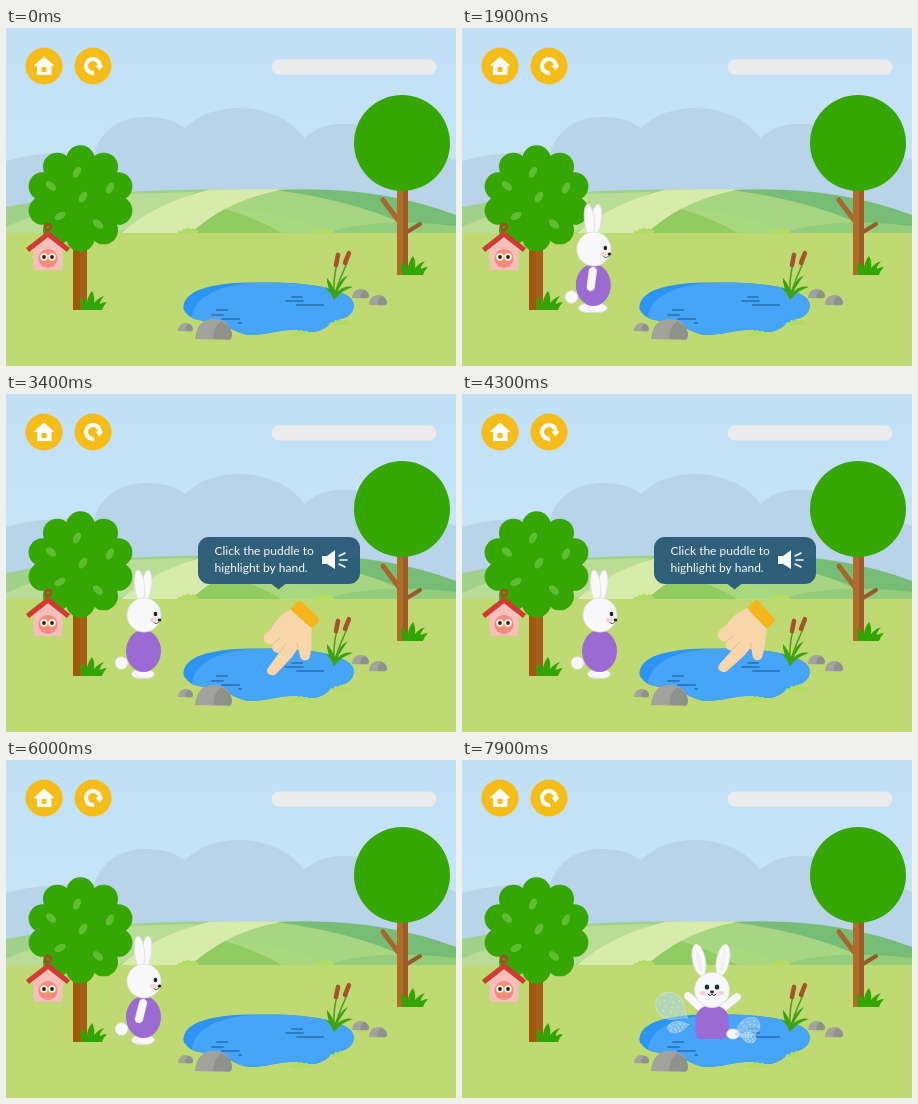
An HTML page with a canvas for the animation above (8 s loop, 450x338 px).

```html
<!DOCTYPE html>
<html lang="en">
<head>
<meta charset="utf-8">
<title>Puddle</title>
<style>
html, body { margin: 0; width: 100%; height: 100%; overflow: hidden; background: #c3e1f6; }
canvas { display: block; width: 450px; height: 338px; }
</style>
</head>
<body>
<canvas id="stage"></canvas>
<script>
const W = 450, H = 338, LOOP = 8000, TAU = Math.PI * 2;
const ARRIVE = 1970, JUMP = 6050, LAND = 6600, SPLASH = 750;
const canvas = document.getElementById('stage');
const dpr = window.devicePixelRatio || 1;
canvas.width = W * dpr;
canvas.height = H * dpr;
const screen2d = canvas.getContext('2d');
const backdrop = document.createElement('canvas');
backdrop.width = canvas.width;
backdrop.height = canvas.height;
let c = backdrop.getContext('2d');
c.scale(dpr, dpr);
screen2d.scale(dpr, dpr);

const clamp = v => Math.max(0, Math.min(1, v));
const lerp = (a, b, k) => a + (b - a) * k;
const ramp = (t, a, b) => clamp((t - a) / (b - a));
const smooth = k => k * k * (3 - 2 * k);

function ell(x, y, rx, ry, fill, rot = 0, edge) {
  c.beginPath();
  c.ellipse(x, y, rx, ry, rot, 0, TAU);
  c.fillStyle = fill;
  c.fill();
  if (edge) { c.strokeStyle = edge; c.lineWidth = 0.8; c.stroke(); }
}
const dot = (x, y, r, fill, edge) => ell(x, y, r, r, fill, 0, edge);
function shape(d, fill) {
  c.fillStyle = fill;
  c.fill(new Path2D(d));
}
function line(d, color, width, cap = 'round') {
  c.strokeStyle = color;
  c.lineWidth = width;
  c.lineCap = cap;
  c.lineJoin = 'miter';
  c.stroke(new Path2D(d));
}
function box(x, y, w, h, r, fill) {
  c.beginPath();
  c.roundRect(x, y, w, h, r);
  c.fillStyle = fill;
  c.fill();
}
function placed(x, y, rot, draw) {
  c.save();
  c.translate(x, y);
  c.rotate(rot);
  draw();
  c.restore();
}

function landscape() {
  const sky = c.createLinearGradient(0, 0, 0, 170);
  sky.addColorStop(0, '#c1e0f6');
  sky.addColorStop(1, '#c8e5f7');
  c.fillStyle = sky;
  c.fillRect(0, 0, W, H);
  shape('M0 133 Q40 122 88 125 C96 99 117 89 142 89 Q164 89 179 100 C194 86 212 80 232 80 C262 80 286 92 298 110 C311 99 325 95 342 96 C366 97 385 108 395 125 Q425 122 450 132 V205 H0Z', '#b7d4e8');
  shape('M0 179 Q90 161 215 161.500 Q300 162 370 180 L450 200 V206 H0Z', '#9fd18a');
  shape('M0 199 Q50 176 120 166 L190 164 L110 206 H0Z', '#b9dd96');
  shape('M114 206 Q150 174 205 161.500 H278 Q220 178 184 206Z', '#d7ebab');
  shape('M184 206 Q222 172 278 161.500 Q330 170 400 206Z', '#a9d97e');
  shape('M184 206 Q200 191 219 181 Q250 190 278 206Z', '#90cc62');
  shape('M219 181 Q245 167 278 161.500 Q360 164 450 206 H330 Q280 184 219 181Z', '#a6d681');
  shape('M270 162 Q370 157 450 187 V206 H418 Q360 174 270 162Z', '#78bd75');
  shape('M318 206 Q365 188 450 198 V206Z', '#94ce7d');
  c.fillStyle = '#c0da73';
  c.fillRect(0, 205, W, H - 205);
}

function bush(x, y, s = 1) {
  shape(`M${x - 10 * s} ${y} q2 -5 5 -2 q0 -5 4 -2 q2 -4 5 0 q4 -3 4 1 q4 -1 3 3Z`, '#b3dd62');
}

function tuft(x, y) {
  shape(`M${x} ${y} l-1 -13 q6 3 7 7 q0 -7 5 -13 q3 5 2 12 q4 -5 10 -7 q-5 6 -4 8 q3 -2 7 -2 q-4 4 -5 8Z`, '#32a600');
}

function leftTree() {
  box(67, 210, 8, 72, 0, '#a3560c');
  box(74, 210, 7, 72, 0, '#a4601a');
  const green = '#35a602';
  ell(74, 170, 41, 42, green);
  for (let i = 0; i < 10; i++) {
    const a = i * TAU / 10;
    dot(74.5 + 39.5 * Math.sin(a), 170.5 - 39 * Math.cos(a), 14.3, green);
  }
  [[45, 158, .7], [71, 144, -1.1], [104, 160, -1.1], [77, 169, -1], [54, 188, -.5], [92, 196, .7]]
    .forEach(([x, y, a]) => ell(x, y, 6, 3.5, '#5fbd33', a));
  tuft(75, 282);
}

function birdhouse() {
  c.beginPath();
  c.arc(42, 199, 3, 0, TAU);
  c.strokeStyle = '#c8352e';
  c.lineWidth = 1.8;
  c.stroke();
  shape('M27 217 L42 204 L57 217 L56 242 H28Z', '#f5bfba');
  line('M21.500 222 L42 206 L62.500 222', '#d13a33', 5, 'butt');
  dot(42, 230.5, 9.5, '#f28b80');
  [38, 46].forEach(x => {
    dot(x, 229, 3.7, '#fff4d8');
    dot(x, 229, 1.9, '#222');
  });
  shape('M40.500 232 h3 l-1.500 3Z', '#f5a623');
}

function rightTree() {
  line('M392 192 L377 172', '#a8652c', 5);
  line('M401 204 L414 196', '#98592a', 4);
  box(391, 155, 6, 92, 0, '#b26c2a');
  box(397, 155, 5, 92, 0, '#9c5c27');
  dot(396, 115, 48, '#36a602');
  tuft(396, 247);
}

function stone(x, y, w, h) {
  shape(`M${x} ${y} q${w * .05} ${-h} ${w * .5} ${-h} q${w * .45} 0 ${w * .5} ${h * .8} q0 ${h * .25} -3 ${h * .25}Z`, '#a2a39d');
  shape(`M${x + w * .5} ${y} q-1 ${-h * .5} ${w * .2} ${-h * .9} q${w * .3} ${h * .2} ${w * .3} ${h * .75} l-2 ${h * .15}Z`, '#8f918b');
}

function pond() {
  const d = 'M177.500 278 C180 259 215 254 255 254.500 C310 254 344 262 347.500 275 C349 288 338 290 330 293 C320 298 316 304 306 304 C296 304 292 301 284 302 C268 303 258 307 246 307 C232 307 226 299 212 296 C198 292 188 293 182 287 C178 283 177 281 177.500 278Z';
  shape(d, '#2c94f4');
  c.save();
  c.clip(new Path2D(d));
  shape('M186 296 C183 272 208 259 240 255.500 C300 251 352 258 352 278 V312 H200Z', '#46a5f6');
  c.restore();
  [[210, 282, 12], [205, 287, 13], [215, 291, 19], [232, 295, 4],
   [285, 269, 12], [279, 273, 19], [290, 277, 28]]
    .forEach(([x, y, w]) => box(x, y - 1, w, 2, 1, '#2d7bc0'));
  stone(189, 311, 37, 20);
  stone(172, 303, 15, 8);
  stone(346, 270, 17, 9);
  stone(363, 277, 18, 10);
  bush(294, 308);
  bush(333, 297);
}

function reeds() {
  line('M328 271 Q327 250 331 236 M329 265 Q334 250 341 235', '#4c9a22', 1.5);
  shape('M328 271 Q320 257 321 250 Q327 257 329 265 Q333 251 342 247 Q335 257 331 264 Q339 257 347 259 Q336 262 329 271Z', '#3ba40c');
  shape('M327 266 Q325 260 319 260 Q325 264 327 270Z', '#3ba40c');
  [[331, 232, .2], [341, 230, .38]].forEach(([x, y, a]) => placed(x, y, a, () => {
    box(-2.3, -7.5, 4.6, 15, 2.3, '#a5532c');
  }));
}

function controls() {
  dot(38, 38, 18.5, '#f6bd19');
  dot(87, 38, 18.5, '#f6bd19');
  shape('M38 28.500 L48.500 38 H45.500 V47 H31 V38 H27.500Z', '#fff');
  box(35.5, 39, 5, 5, 0, '#f6bd19');
  c.beginPath();
  c.arc(87, 38, 7, Math.PI * .45, TAU);
  c.strokeStyle = '#fff';
  c.lineWidth = 4;
  c.lineCap = 'butt';
  c.stroke();
  shape('M89.500 37.500 H97.500 L93.500 42.500Z', '#fff');
  box(265.5, 31.5, 165, 15, 7.5, '#ebebeb');
}

const WHITE = '#f8f8fa', EDGE = '#dedee2', PURPLE = '#9b6ad2';

function limb(x1, y1, x2, y2, w) {
  const d = `M${x1} ${y1} L${x2} ${y2}`;
  line(d, EDGE, w + 1.4);
  line(d, WHITE, w);
}

// Side view; the origin is the point on the ground below the head.
function walker(x, y, step, arm, tilt = 0) {
  placed(x, y, tilt, () => {
    const s = Math.sin(step);
    dot(-22.5, -15, 6.3, WHITE, EDGE);
    ell(-3 - s * 3, -4, 9.5, 4.5, WHITE, 0, EDGE);
    ell(1 + s * 3, -4, 9.5, 4.5, WHITE, 0, EDGE);
    ell(-.5, -27, 17.5, 21, PURPLE);
    if (arm) limb(-1, -41, -5 + s * 2, -25, 7);
    ell(2.5, -92, 5, 16, WHITE, .12, EDGE);
    ell(-4.5, -92, 5, 16, WHITE, -.1, EDGE);
    dot(0, -63, 17, WHITE, EDGE);
    ell(9.5, -58, 3.5, 2.5, '#f9d3d3');
    ell(11.5, -64, 1.8, 2.2, '#222');
    ell(15.5, -58, 1.8, 1.5, '#222');
    line('M10 -55 Q13 -53 15 -56', '#444', .9);
  });
}

function bather(t) {
  const p = ((t - LAND) / SPLASH) % 1;
  const up = clamp(1.33 * (.5 - .5 * Math.cos(TAU * (p - .4))));
  const lean = lerp(.48, .2, up);
  limb(241, 250, lerp(233, 226, up), lerp(257, 236, up), 7);
  limb(260, 249, lerp(278, 275, up), lerp(241, 237, up), 7);
  box(233.5, 246, 33, 33, [13, 13, 7, 5], PURPLE);
  ell(271, 274, 6.5, 5, WHITE, 0, EDGE);
  [-1, 1].forEach(side => {
    const x = 249 + side * lerp(14, 12, up);
    ell(x, 200, 6.5, 16, WHITE, side * lean, EDGE);
    ell(x, 201, 2.5, 11, '#f1f1f3', side * lean);
  });
  dot(250, 230, 17.5, WHITE, EDGE);
  [[245, -1], [255, 1]].forEach(([x, side]) => {
    dot(x, 227, 3.4, '#dcebf2');
    ell(x, 227, 2.2, 2.6, '#222');
    ell(x + side * 4, 233, 3, 2, '#f8d0d0');
  });
  ell(250, 232, 2, 1.4, '#222');
  line('M246 234 Q248 237 250 234 Q252 237 254 234', '#333', 1);
  splash(p);
}

// A drop whose narrow end points along rot.
function spray(x, y, rx, ry, rot) {
  placed(x, y, rot, () => {
    const d = `M${rx * 1.4} 0 C${rx * .8} ${ry * .5} ${rx * .6} ${ry} 0 ${ry} C${-rx * 1.3} ${ry} ${-rx * 1.3} ${-ry} 0 ${-ry} C${rx * .6} ${-ry} ${rx * .8} ${-ry * .5} ${rx * 1.4} 0Z`;
    shape(d, '#acd3ee');
    line(d, '#d9eefa', .8);
    for (let i = 0; i < 14; i++) {
      const a = i * 2.4, r = Math.sqrt((i + .5) / 17);
      dot(Math.cos(a) * rx * r, Math.sin(a) * ry * r, .9, '#dff0fb');
    }
  });
}

function splash(p) {
  const d = 27 * (p - .4);
  c.save();
  c.globalAlpha = Math.min(.9, Math.max(0, 1.4 - 1.2 * p)) * ramp(p, 0, .12);
  spray(217 - d, 246, 15, 13, .6);
  spray(229 - d * 1.6, 267, 9, 5.5, -.2);
  spray(274 + d * 1.4, 262 + d * .6, 12, 9, 2.6);
  spray(271 + d * 1.8, 273 + d * .5, 7, 5, -2.8);
  c.restore();
}

function bubble() {
  box(192, 143, 162, 47, 11, '#2b5b78');
  shape('M265 189.500 H280 L272.500 195.500Z', '#2b5b78');
  c.fillStyle = '#fff';
  c.font = '12px Lato, sans-serif';
  c.fillText('Click the puddle to', 208.5, 160.5);
  c.fillText('highlight by hand.', 208.5, 177.5);
  shape('M316 162 H321 L329 156 V175 L321 170 H316Z', '#fff');
  line('M333 162 L339 159 M334 166 H341 M333 170 L339 173', '#fff', 1.6);
}

function hand(t) {
  placed(300, 222, .045 * (1 - Math.cos(TAU * (t - 3400) / 600)), () => {
    c.translate(-300, -222);
    shape('M286 215 L306 233 C305 244 306 254 304 262 C303 268 295 268 294 262 L292 254 L286 263 L271 279 C267 284 258 280 262 274 L273 259 C267 259 265 255 267 250 C262 252 256 247 258 242 C259 239 262 238 265 235 C270 225 277 219 286 215Z', '#f8d6a9');
    line('M267 250 L274 244 M273 259 L280 250 M292 254 L291 249', '#e6b985', .9);
    shape('M292 207 Q294 206 296 208 L312 223 Q314 226 312 228 L308 233 Q306 235 303 232 L287 218 Q284 215 286 213Z', '#f6b51b');
  });
}

function rabbit(t) {
  if (t < ARRIVE) {
    walker(lerp(-38, 138, t / ARRIVE), 284, (ARRIVE - t) / 60, true);
  } else if (t < JUMP) {
    walker(138, 284, 0, t > 5700);
  } else if (t < LAND) {
    const k = ramp(t, JUMP, LAND);
    walker(lerp(138, 250, k), lerp(284, 288, k) - 160 * k * (1 - k), 1.2, true, .15 * Math.sin(k * Math.PI));
  } else {
    bather(t);
  }
}

landscape();
bush(177, 205.5, .6);
bush(317, 205.5);
leftTree();
birdhouse();
rightTree();
pond();
reeds();
controls();
c = screen2d;

function draw(t) {
  c.globalAlpha = 1;
  c.drawImage(backdrop, 0, 0, W, H);
  rabbit(t);
  const hint = smooth(ramp(t, 2200, 2400)) * (1 - smooth(ramp(t, 5450, 5600)));
  if (hint > 0) {
    c.globalAlpha = hint * .97;
    bubble();
  }
  const tap = ramp(t, 2400, 2550) * (1 - ramp(t, 5400, 5550));
  if (tap > 0) {
    c.globalAlpha = tap;
    hand(t);
  }
  c.globalAlpha = 1;
}

const start = performance.now();
function tick() {
  draw((performance.now() - start) % LOOP);
  requestAnimationFrame(tick);
}
tick();
</script>
</body>
</html>
```
